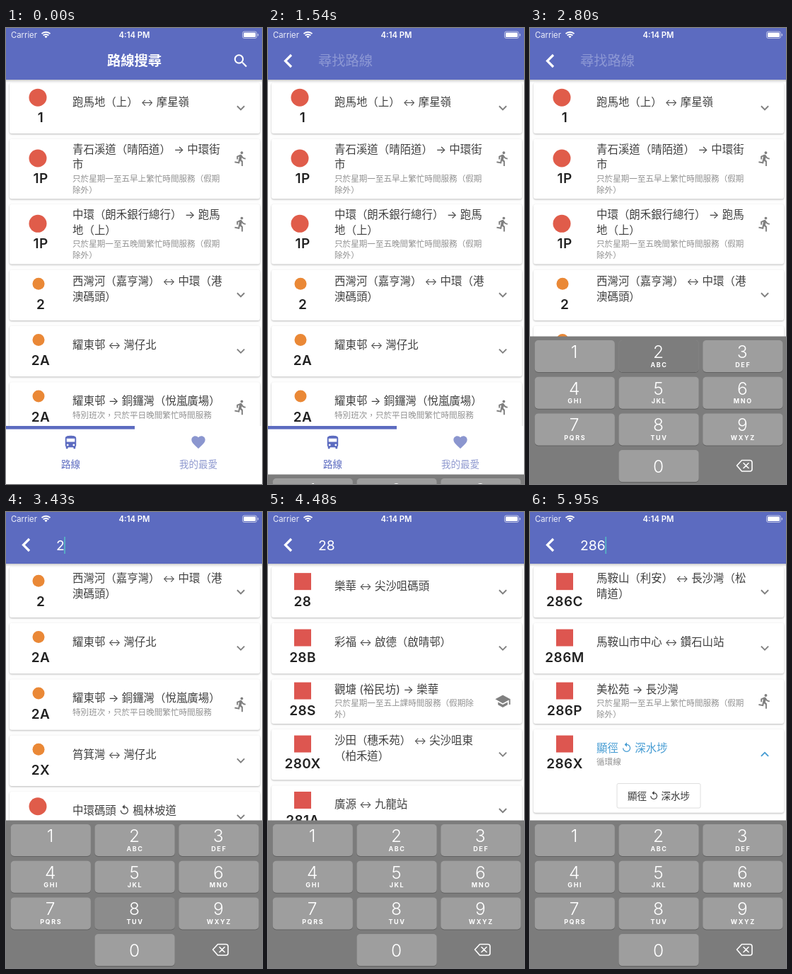
An HTML page for the animation above (6.02 s loop, 362 by 644 pixels).

```html
<!DOCTYPE html>
<html lang="zh-HK">
<head>
<meta charset="utf-8">
<title>路線搜尋</title>
<style>
  html, body { margin: 0; width: 100%; height: 100%; overflow: hidden; background: #fdfdfd; }
  svg { display: block; width: 362px; height: 644px; font-family: Inter, "Noto Sans CJK HK", "Noto Sans CJK TC", "Noto Sans CJK", sans-serif; }
  .card { fill: #fff; filter: drop-shadow(0 1px 1px #0004); }
</style>
</head>
<body>
<svg id="stage" viewBox="0 0 362 644"></svg>
<script>
const LOOP = 6020, INDIGO = '#5c6bc0', BLUE = [70, 156, 211], INK = [64, 64, 64];
const SEARCH_AT = 1400, KEYBOARD_AT = 1517, RESIZE_AT = 1600, EXPAND_AT = 5330;
const TYPED = [[2940, '2'], [3510, '28'], [4760, '286']];
const PRESSES = [['2', 2720, 2930], ['8', 3400, 3510], ['6', 4640, 4760]];

const ICONS = {
  more: 'M16.59 8.59 12 13.17 7.41 8.59 6 10l6 6 6-6z',
  run: 'M13.49 5.48c1.1 0 2-.9 2-2s-.9-2-2-2-2 .9-2 2 .9 2 2 2zm-3.6 13.9l1-4.4 2.1 2v6h2v-7.5l-2.1-2 .6-3c1.3 1.5 3.3 2.5 5.5 2.5v-2c-1.9 0-3.5-1-4.3-2.4l-1-1.6c-.4-.6-1-1-1.7-1-.3 0-.5.1-.8.1l-5.2 2.2v4.7h2v-3.4l1.8-.7-1.6 8.1-4.9-1-.4 2 7 1.4z',
  school: 'M5 13.18v4L12 21l7-3.82v-4L12 17l-7-3.82zM12 3 1 9l11 6 9-4.91V17h2V9L12 3z',
  search: 'M15.5 14h-.79l-.28-.27A6.5 6.5 0 1 0 13.73 14.43l.27.28v.79l5 4.99L20.49 19zm-6 0a4.5 4.5 0 1 1 0-9 4.5 4.5 0 0 1 0 9z',
  bus: 'M4 16c0 .88.39 1.67 1 2.22V20c0 .55.45 1 1 1h1c.55 0 1-.45 1-1v-1h8v1c0 .55.45 1 1 1h1c.55 0 1-.45 1-1v-1.78c.61-.55 1-1.34 1-2.22V6c0-3.5-3.58-4-8-4s-8 .5-8 4v10zm3.5 1a1.5 1.5 0 1 1 0-3 1.5 1.5 0 0 1 0 3zm9 0a1.5 1.5 0 1 1 0-3 1.5 1.5 0 0 1 0 3zm1.5-6H6V6h12v5z',
  heart: 'M12 21.35l-1.45-1.32C5.4 15.36 2 12.28 2 8.5 2 5.42 4.42 3 7.5 3c1.74 0 3.41.81 4.5 2.09C13.09 3.81 14.76 3 16.5 3 19.58 3 22 5.42 22 8.5c0 3.78-3.4 6.86-8.55 11.54z'
};

// Rows: operator, number, trailing icon, title lines, note lines, expandable
const row2 = ['orange', '2', 'more', ['西灣河（嘉亨灣） ↔ 中環（港', '澳碼頭）']];
const row2A = ['orange', '2A', 'more', ['耀東邨 ↔ 灣仔北']];
const row2AEvening = ['orange', '2A', 'run', ['耀東邨 → 銅鑼灣（悅嵐廣場）'], ['特別班次，只於平日晚間繁忙時間服務']];
const weekdays = part => [`只於星期一至五${part}繁忙時間服務（假期`, '除外）'];
const LISTS = {
  '': [
    ['red', '1', 'more', ['跑馬地（上） ↔ 摩星嶺']],
    ['red', '1P', 'run', ['青石溪道（晴陌道） → 中環街', '市'], weekdays('早上')],
    ['red', '1P', 'run', ['中環（朗禾銀行總行） → 跑馬', '地（上）'], weekdays('晚間')],
    row2, row2A, row2AEvening
  ],
  '2': [
    row2, row2A, row2AEvening,
    ['orange', '2X', 'more', ['筲箕灣 ↔ 灣仔北']],
    ['red', '3', 'more', ['中環碼頭 ↺ 楓林坡道']]
  ],
  '28': [
    ['square', '28', 'more', ['樂華 ↔ 尖沙咀碼頭']],
    ['square', '28B', 'more', ['彩福 ↔ 啟德（啟晴邨）']],
    ['square', '28S', 'school', ['觀塘 (裕民坊) → 樂華'], ['只於星期一至五上課時間服務（假期除', '外）']],
    ['square', '280X', 'more', ['沙田（穗禾苑） ↔ 尖沙咀東', '（柏禾道）']],
    ['square', '281A', 'more', ['廣源 ↔ 九龍站']]
  ],
  '286': [
    ['square', '286C', 'more', ['馬鞍山（利安） ↔ 長沙灣（松', '晴道）']],
    ['square', '286M', 'more', ['馬鞍山市中心 ↔ 鑽石山站']],
    ['square', '286P', 'run', ['美松苑 → 長沙灣'], weekdays('早上')],
    ['square', '286X', 'more', ['顯徑 ↺ 深水埗'], ['循環線'], true]
  ]
};

const text = (s, x, cy, size, fill, extra = '', rise = .38) =>
  `<text x="${x}" y="${cy + size * rise}" font-size="${size}" fill="${fill}" ${extra}>${s}</text>`;
const latin = (s, x, cy, size, fill, extra) => text(s, x, cy, size, fill, extra, .364);
const icon = (name, x, y, fill, scale = .965, id = '') =>
  `<g transform="translate(${x} ${y})"><path ${id} d="${ICONS[name]}" fill="${fill}" fill-rule="evenodd" transform="scale(${scale}) translate(-12 -12)"/></g>`;
const rect = (x, y, w, h, fill, extra = '') =>
  `<rect x="${x}" y="${y}" width="${w}" height="${h}" fill="${fill}" ${extra}/>`;
const smallArrow = s => s.replace('↔', '<tspan font-size="13">↔</tspan>');
const MID = 'text-anchor="middle"';
const LINE = 21.7, NOTE_LINE = 16, CARD = 71.5;

function badge(kind, y) {
  if (kind === 'square') return rect(37, y - 12, 24, 24, '#dd5650');
  return kind === 'red'
    ? `<circle cx="45" cy="${y}" r="12.5" fill="#e05c4a"/>`
    : `<circle cx="46" cy="${y - 1}" r="8.5" fill="#ea8836"/>`;
}

function card([kind, number, trailing, titles, notes = [], expands], top) {
  const content = LINE * titles.length + NOTE_LINE * Math.max(notes.length, 1);
  const height = notes.length === 2 ? content + 9 : CARD;
  const mid = top + height / 2;
  const first = mid - content / 2 + 9.5;
  const iconY = titles.length + notes.length === 4 ? mid - 14.5 : mid - .3;
  const noteY = first + LINE * titles.length - 2;
  const svg = rect(5, top, 354, height, '', `class="card" rx="3" ${expands ? 'id="panel"' : ''}`) +
    badge(kind, mid - 15) +
    latin(number, 49, mid + 12.8, 19, '#222', `${MID} font-weight="600" letter-spacing=".4"`) +
    titles.map((s, i) => text(smallArrow(s), 94, first + LINE * i, 15.45, '#404040', expands ? 'id="openTitle"' : '')).join('') +
    notes.map((s, i) => text(s, 94, noteY + NOTE_LINE * i, 11.58, '#919191')).join('') +
    icon(trailing, 332, iconY, '#808080', .965, expands ? 'id="chevron"' : '') +
    (expands ? `<g clip-path="url(#panelClip)">
      ${rect(123, 383.5, 118, 34.5, '#fff', 'rx="2" stroke="#dedede"')}
      ${text('顯徑 ↺ 深水埗', 182, 401, 13.5, '#333', MID)}</g>` : '');
  return { svg, next: top + height + 7.9 };
}

function list(key) {
  let top = 77.4, out = '';
  for (const row of LISTS[key]) {
    const c = card(row, top);
    out += c.svg;
    top = c.next;
  }
  return `<g id="list${key}">${out}</g>`;
}

function keypad() {
  const letters = ['', 'ABC', 'DEF', 'GHI', 'JKL', 'MNO', 'PQRS', 'TUV', 'WXYZ'];
  const key = (label, sub, col, line) => {
    const x = 6.7 + 118.8 * col, y = 441 + 51.7 * line, cx = x + 56;
    return rect(x, y + 1, 113.2, 45, '#626262', 'rx="5"') + rect(x, y, 113.2, 45, '#9e9e9e', 'rx="5"') +
      rect(x, y, 113.2, 45, '#7d7d7d', `rx="5" id="key${label}" opacity="0"`) +
      latin(label, cx, y + (label === '0' ? 22.5 : 16), 24.5, '#fff', `${MID} font-weight="300"`) +
      latin(sub, cx + 1, y + 34.5, 9, '#fff', `${MID} font-weight="700" letter-spacing="1.6"`);
  };
  return rect(0, 435.5, 362, 212, '#7c7c7c') +
    letters.map((s, i) => key(String(i + 1), s, i % 3, Math.floor(i / 3))).join('') + key('0', '', 1, 3) +
    `<path d="M299.5 610.5H311q3 0 3 3v9.5q0 3-3 3H299.5L292.5 618zM302 614.5l7 7m0-7l-7 7"
      fill="none" stroke="#fff" stroke-width="1.6" stroke-linejoin="round" stroke-linecap="round"/>`;
}

const statusBar = latin('Carrier', 7, 10, 11.3, '#eceef9') +
  `<g fill="none" stroke="#fff" stroke-width="1.9"><path d="M50.5 8.2a8.5 8.5 0 0 1 12 0M52.7 10.5a5.4 5.4 0 0 1 7.6 0"/></g>
   <path d="M56.5 14.3l-2.1-2.3a3 3 0 0 1 4.2 0z" fill="#fff"/>` +
  latin('4:14 PM', 181.5, 10, 11.3, '#fff', `${MID} font-weight="600"`) +
  rect(334.5, 5, 20, 9.5, 'none', 'rx="2.5" stroke="#fff" stroke-opacity=".6"') +
  rect(336, 6.5, 17, 6.5, '#fff', 'rx="1.3"') + rect(355.7, 8, 1.4, 3.5, '#fff', 'rx=".7" opacity=".6"');

const stage = document.getElementById('stage');
stage.innerHTML = `
  <defs>
    <clipPath id="listClip"><rect id="viewport" y="73" width="362" height="489"/></clipPath>
    <clipPath id="panelClip"><rect id="panelArea" x="5" y="378" width="354" height="0"/></clipPath>
    <linearGradient id="shade" x2="0" y2="1"><stop stop-opacity=".2"/><stop offset="1" stop-opacity="0"/></linearGradient>
  </defs>
  ${rect(0, 0, 362, 644, '#fdfdfd')}
  <g clip-path="url(#listClip)">${Object.keys(LISTS).map(list).join('')}</g>
  ${rect(0, 562, 362, 82, '#fff')}${rect(0, 562, 182, 4.6, INDIGO)}
  ${icon('bus', 91.5, 585.5, INDIGO)}${icon('heart', 272, 585, '#8b96cf')}
  ${text('路線', 91.5, 616, 13.5, INDIGO, MID + ' font-weight="500"')}
  ${text('我的最愛', 272, 616, 13.5, '#8e98cf', MID)}
  ${rect(0, 73, 362, 4, 'url(#shade)')}${rect(0, 0, 362, 73, INDIGO)}${statusBar}
  <g id="titleBar">${text('路線搜尋', 181.5, 46, 19.3, '#fff', MID + ' font-weight="700"')}${icon('search', 332, 46.5, '#fff', 1.03)}</g>
  <g id="searchBar">
    <path d="M33 38l-8.5 8.5 8.5 8.5" fill="none" stroke="#fff" stroke-width="3.2"/>
    ${text('尋找路線', 71, 46, 19.3, '#8d98d4', 'id="hint"')}
    ${latin('', 71, 46.5, 19.3, '#fff', 'id="query"')}
    ${rect(70, 35, 1.8, 24, '#56b3c4', 'id="cursor"')}
  </g>
  <g id="keyboard">${keypad()}</g>`;

const $ = id => document.getElementById(id);
const show = (id, on) => $(id).setAttribute('display', on ? 'inline' : 'none');
const clamp = v => Math.max(0, Math.min(1, v));

function draw(t) {
  const searching = t >= SEARCH_AT;
  show('titleBar', !searching);
  show('searchBar', searching);

  const [typedAt, query] = TYPED.filter(([at]) => t >= at).pop() || [1810, ''];
  for (const key in LISTS) show('list' + key, key === query);
  show('hint', !query);
  $('query').textContent = query;
  show('cursor', t >= typedAt && (t - typedAt) % 1000 < 500);
  $('cursor').setAttribute('x', 70 + 12.1 * query.length);

  // Critically damped spring
  const w = Math.max(0, t - KEYBOARD_AT) * .0175;
  $('keyboard').setAttribute('transform', `translate(0 ${209 * (1 + w) * Math.exp(-w)})`);
  $('viewport').setAttribute('height', t < RESIZE_AT ? 489 : 363);

  for (const [key, down, up] of PRESSES)
    $('key' + key).setAttribute('opacity', Math.min(clamp((t - down) / 60), clamp(1 - (t - up) / 150)));

  const p = clamp((t - EXPAND_AT) / 200), open = p * p * (3 - 2 * p);
  $('panel').setAttribute('height', CARD + 46.5 * open);
  $('panelArea').setAttribute('height', 46.5 * open);
  $('openTitle').setAttribute('fill', `rgb(${INK.map((c, i) => Math.round(c + (BLUE[i] - c) * open))})`);
  $('chevron').setAttribute('transform', `rotate(${180 * open}) scale(.965) translate(-12 -12)`);
  $('chevron').setAttribute('fill', open > .5 ? '#469cd3' : '#808080');
}

function tick() {
  draw(performance.now() % LOOP);
  requestAnimationFrame(tick);
}
tick();
</script>
</body>
</html>
```
